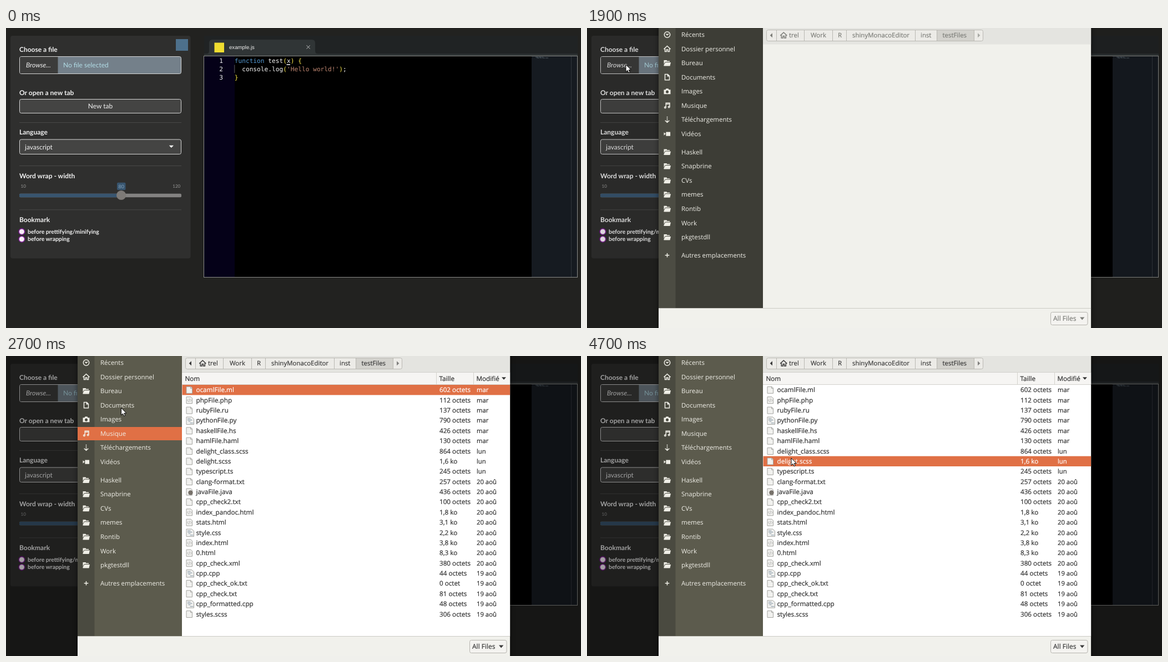
Recreate the animation shown at these times as an HTML page. Size 1036 by 541 pixels, loop 8 s.

```html
<!DOCTYPE html>
<html lang="en">
<head>
<meta charset="utf-8">
<title>Code editor, opening a file</title>
<style>
html, body { margin: 0; width: 100%; height: 100%; overflow: hidden; background: #222220; }
svg { display: block; width: 1036px; height: 541px; }
text { white-space: pre; text-rendering: geometricPrecision; }
.page { font: 12px Lato, sans-serif; fill: #f2f2f2; }
.bold { font-weight: 700; }
.italic { font-style: italic; }
.code { font: 11.2px "DejaVu Sans Mono", monospace; fill: #f4f4f4; }
.ui { font: 11.45px "Open Sans", sans-serif; }
.file { font: 11.7px "Open Sans", sans-serif; fill: #333; stroke: #333; stroke-width: .22; }
.on { fill: #fff; stroke: #fff; }
#path text { fill: currentColor; stroke: currentColor; stroke-width: .2; }
</style>
</head>
<body>
<svg id="stage" viewBox="0 0 1036 541" xmlns="http://www.w3.org/2000/svg">
  <filter id="blur" x="-10%" width="120%"><feGaussianBlur stdDeviation="5"/></filter>
  <g id="page"></g>
  <rect id="dim" width="1036" height="541" opacity="0"/>
  <g id="dialog" display="none">
    <g id="frame"></g>
    <g id="side"></g>
    <g id="path"></g>
    <g id="list"></g>
  </g>
  <path id="cursor" d="M0 0V13.2L3 10.4L5 14.8L7.2 13.8L5.3 9.6H9.3Z" fill="#fff" stroke="#000" stroke-width="1"/>
</svg>
<script>
const $ = id => document.getElementById(id);
const NS = "http://www.w3.org/2000/svg";

function add(parent, tag, attrs, text) {
  const el = document.createElementNS(NS, tag);
  for (const k in attrs) el.setAttribute(k, attrs[k]);
  if (text !== undefined) el.textContent = text;
  return parent.appendChild(el);
}
const rect = (p, x, y, width, height, fill, more) =>
  add(p, "rect", { x, y, width, height, fill, ...more });
const label = (p, x, y, text, cls, more) =>
  add(p, "text", { x, y, class: cls, ...more }, text);
const line = (p, d, stroke, more) =>
  add(p, "path", { d, stroke, fill: "none", ...more });
const shape = (p, d, fill) => add(p, "path", { d, fill });

// ---- page: control panel ----
function buildPanel(p) {
  rect(p, 0, 0, 1036, 541, "#222220");
  rect(p, 8, 14, 324.5, 401.5, "#2f2f2e", { rx: 4 });
  rect(p, 306, 20, 22, 21, "#4d708c");
  const bold = [
    [43, "Choose a file"], [120.5, "Or open a new tab"], [192.3, "Language"],
    [270.7, "Word wrap - width"], [349.8, "Bookmark"]
  ];
  for (const [y, s] of bold) label(p, 24, y, s, "page bold");
  for (const y of [170.5, 248.5, 327.8]) line(p, `M24 ${y}H316`, "#484847");

  const box = { rx: 3, stroke: "#d6d6d6" };
  rect(p, 24.5, 51.5, 291, 31, "#74808a", box);
  shape(p, "M93.5 52H27Q25 52 25 54V80Q25 82 27 82H93.5Z", "#3c3c3b");
  label(p, 36, 71.3, "Browse...", "page italic");
  label(p, 103, 71, "No file selected", "page", { style: "fill:#b2dce6" });

  rect(p, 24.5, 128.5, 291, 25, "#444443", box);
  label(p, 170, 145.2, "New tab", "page", { "text-anchor": "middle" });
  rect(p, 24.5, 201, 291, 26.5, "#444443", box);
  label(p, 34, 218.7, "javascript", "page");
  shape(p, "M293.8 211.8H302L297.9 216Z", "#fff");

  rect(p, 24, 298.7, 292, 6.6, "#838281", { rx: 2 });
  rect(p, 24, 298.7, 184, 6.6, "#38556f", { rx: 2 });
  add(p, "circle", { cx: 207.6, cy: 301.5, r: 8.6, fill: "#7d7a77" });
  rect(p, 200, 278.7, 15.5, 13.6, "#38556f", { rx: 2 });
  label(p, 207.7, 288.6, "80", "page", { style: "font-size:8.8px;fill:#86a4bb", "text-anchor": "middle" });
  const tick = { style: "font-size:8px;fill:#9a9a99" };
  label(p, 26.5, 287.8, "10", "page", tick);
  label(p, 300.3, 287.8, "120", "page", tick);

  [[367.2, "before prettifying/minifying"], [380.8, "before wrapping"]].forEach(([y, s]) => {
    add(p, "circle", { cx: 28.4, cy: y, r: 5.3, fill: "#f7eef7", stroke: "#7d2092", "stroke-width": 1.6 });
    label(p, 39, y + 3.4, s, "page bold", { style: "font-size:10.4px" });
  });
}

// ---- page: editor ----
function buildEditor(p) {
  rect(p, 357, 14, 673, 36, "#202324");
  rect(p, 357, 46.5, 673, 4, "#303536");
  shape(p, "M360 47Q366 47 366 41V27Q366 21 372 21H551Q557 21 557 27V41Q557 47 563 47Z", "#303536");
  rect(p, 375.5, 26.5, 17.5, 17.5, "#f0dd30");
  label(p, 402, 37.7, "example.js", "", { style: "font:9.6px 'Liberation Sans',sans-serif;fill:#eee" });
  line(p, "M541.5 31.3l6.2 6.2m0-6.2l-6.2 6.2", "#c4c6c6");

  rect(p, 356.5, 50.5, 673, 399, "#000");
  rect(p, 357, 51, 55, 398, "#050118");
  rect(p, 947, 51, 82, 398, "#161b21");
  line(p, "M1018.5 51V449", "#30343b");
  line(p, "M954 52.5h14M956 54h9m1 0h12", "#5d6a72", { "stroke-width": .8, "stroke-dasharray": "5 1" });
  rect(p, 356.5, 50.5, 673, 399, "none", { stroke: "#8a8b88" });

  const lines = [
    [["function", "#569cd6"], [" test"], ["(", "#fbe94a"], ["x"], [") {", "#fbe94a"]],
    [["  console.log"], ["(", "#fbe94a"], ["'Hello world!'", "#bd8570"], [")", "#fbe94a"], [";"]],
    [["}", "#fbe94a"]]
  ];
  lines.forEach((parts, i) => {
    const y = 62.7 + i * 15.3;
    label(p, 391, y, i + 1, "code", { "text-anchor": "end" });
    const row = label(p, 411.7, y, "", "code");
    for (const [s, fill] of parts) add(row, "tspan", fill ? { fill } : {}, s);
  });
  line(p, "M411.8 66.5V81", "#5c5c5c");
  line(p, "M505.5 66H512", "#fff", { "stroke-width": 1.5 });
}

// ---- dialog: sidebar ----
const ICONS = {
  clock: ["M5.2 0A5.2 5.2 0 1 1-5.2 0A5.2 5.2 0 1 1 5.2 0M-2-1.6L0 .6L2.4-1.6"],
  home: ["M-6 .6L0-5L6 .6M-4 0V5H-1.2V1.5H1.2V5H4V0"],
  folder: ["", "M-6-5.2H-1L0-3.6H4.6V-2.2H-3.4L-6 2ZM-3.2-1.2H6.5L5 5.4H-6V3.4Z"],
  doc: ["M-4-5.2H1L4-2.2V5.2H-4ZM.8-5V-2H4"],
  camera: ["", "M-6-3H-3L-2-5H2L3-3H6V5H-6ZM0-1.6A2.6 2.6 0 1 0 .01-1.6"],
  music: ["M-2.3 3.6V-4.6H4.5V2.4M-2.3-2.4H4.5M-5 3.6a1.3 1.3 0 1 0 2.7 0a1.3 1.3 0 1 0-2.7 0M1.8 2.6a1.3 1.3 0 1 0 2.7 0a1.3 1.3 0 1 0-2.7 0"],
  down: ["M0-5.5V-3.5M0-2.2V0M0 1V4.6M-3.8 1.4L0 5L3.8 1.4"],
  video: ["", "M-2.2-3.4H5.6V3.8H-2.2ZM-6-2.6L-2.6 0L-6 3Z"],
  plus: ["M-3.8 0H3.8M0-3.8V3.8"]
};
function icon(p, name, x, y, color) {
  const [stroke, fill] = ICONS[name];
  const g = add(p, "g", { transform: `translate(${x} ${y})` });
  if (stroke) line(g, stroke, color, { "stroke-width": 1.5 });
  if (fill) add(g, "path", { d: fill, fill: color, "fill-rule": "evenodd" });
}

const PLACES = [
  ["clock", "Récents"], ["home", "Dossier personnel"], ["folder", "Bureau"], ["doc", "Documents"],
  ["camera", "Images"], ["music", "Musique"], ["down", "Téléchargements"], ["video", "Vidéos"]
];
const MARKS = ["Haskell", "Snapbrine", "CVs", "memes", "Rontib", "Work", "pkgtestdll"];
const LEFT = 129, SPLIT = 317, RIGHT = 908.1;

function buildFrame(p) {
  rect(p, LEFT, -20, RIGHT - LEFT, 600, "#000", { filter: "url(#blur)", opacity: .5 });
  rect(p, LEFT, 0, RIGHT - LEFT, 541, "#f1f1ec");
  rect(p, SPLIT, 0, RIGHT - SPLIT, 29.5, "#e4e4e0");
  line(p, `M${LEFT} 505.5H${RIGHT}`, "#cbcac4");
}

function buildSide(p) {
  const bg = rect(p, LEFT, 0, SPLIT - LEFT, 505, "#5c5b4d");
  const strip = rect(p, LEFT, 0, 30.5, 505, "#4a4a40");
  const hover = rect(p, LEFT, 128, SPLIT - LEFT, 24, "#e07045", { display: "none" });
  const place = (name, s, y) => {
    icon(p, name, 144.5, y, "#efeee6");
    label(p, 170, y + 4, s, "ui", { fill: "#f0efe8" });
  };
  PLACES.forEach(([name, s], i) => place(name, s, 12 + i * 25.55));
  MARKS.forEach((s, i) => place("folder", s, 223.6 + i * 25.6));
  place("plus", "Autres emplacements", 409.8);
  return { bg, strip, hover };
}

// ---- dialog: path bar and footer ----
const CRUMBS = [
  [341, "trel", 364], [391, "Work", 403], [442, "R", 452], [467, "shinyMonacoEditor", 478],
  [591, "inst", 601], [630, "testFiles", 640.5]
];
function buildPath(p) {
  rect(p, 323.5, 3.5, 390, 20, "#ecebe7", { rx: 3, stroke: "#b9b8b2" });
  rect(p, 630, 4, 67, 19, "#d3d2cd");
  shape(p, "M334 9.2V17.2L329.6 13.2Z", "currentColor");
  add(p, "path", { d: "M704 9.2V17.2L708.4 13.2Z", fill: "currentColor", opacity: .6 });
  for (const [x, s, tx] of CRUMBS) {
    line(p, `M${x + .5} 4V23`, "#b9b8b2");
    label(p, tx, 17.1, s, "ui");
  }
  line(p, "M697.5 4V23", "#b9b8b2");
  icon(p, "home", 354.3, 13, "currentColor");
  rect(p, 835.5, 512.5, 66.5, 23, "#f4f3f0", { rx: 3, stroke: "#b5b4ae" });
  label(p, 840, 528.2, "All Files", "ui", { style: "font-size:12px" });
  shape(p, "M888 521.6H896.4L892.2 526.4Z", "currentColor");
}

// ---- dialog: file list ----
// name | size | day | icon (p page, c code, t text, j cup)
const FILES = `ocamlFile.ml|602|mar|p
phpFile.php|112|mar|c
rubyFile.ru|137|mar|p
pythonFile.py|790|mar|t
haskellFile.hs|426|mar|p
hamlFile.haml|130|mar|p
delight_class.scss|864|lun|p
delight.scss|1,6 ko|lun|p
typescript.ts|245|lun|p
clang-format.txt|257|20 aoû|p
javaFile.java|436|20 aoû|j
cpp_check2.txt|100|20 aoû|p
index_pandoc.html|1,8 ko|20 aoû|c
stats.html|3,1 ko|20 aoû|c
style.css|2,2 ko|20 aoû|t
index.html|3,8 ko|20 aoû|c
0.html|8,3 ko|20 aoû|c
cpp_check.xml|380|20 aoû|c
cpp.cpp|44|19 aoû|t
cpp_check_ok.txt|0 octet|19 aoû|p
cpp_check.txt|81|19 aoû|p
cpp_formatted.cpp|48|19 aoû|t
styles.scss|306|19 aoû|p`.split("\n").map(s => s.split("|"));
const PITCH = 18.375;

function fileIcon(p, kind, y) {
  const g = add(p, "g", { transform: `translate(324.5 ${y})` });
  const gray = "#a3a39f";
  add(g, "path", { d: kind === "t" ? "M.5-6.5H10L14-3V7H.5Z" : "M.5-6H8.5L11-3.5V6H.5Z", fill: "#f1f1ef", stroke: gray });
  if (kind === "p") line(g, "M8-6V-3H11", gray);
  if (kind === "c") line(g, "M4-2L2 .3L4 2.6M7.5-2L9.5 .3L7.5 2.6M6.5-3L5 3.5", gray, { "stroke-width": .8 });
  if (kind === "t") line(g, "M2.5-3.5H8M2.5-1H11M4 1.5H8M7 4.5H13", "#7f92a0");
  if (kind === "j") add(g, "circle", { cx: 8, cy: 1.5, r: 4.2, fill: "#77716a" });
}

function buildList(p) {
  rect(p, SPLIT, 29.5, RIGHT - SPLIT, 475.5, "#fff");
  rect(p, SPLIT, 29.5, RIGHT - SPLIT, 21.5, "#f6f5f3");
  line(p, "M317 29.5H908M317 51.5H908M775.5 30V51M842.5 30V51", "#d3d2cd");
  [[322.5, "Nom"], [780.5, "Taille"], [847.5, "Modifié"]].forEach(([x, s]) => label(p, x, 44.8, s, "file"));
  shape(p, "M893 38.2H901L897 42.8Z", "#333");
  const bar = rect(p, SPLIT + .6, 0, RIGHT - SPLIT - .6, PITCH, "#e07045");
  const rows = FILES.map(([name, size, day, kind], i) => {
    const y = 61.3 + i * PITCH;
    fileIcon(p, kind, y);
    const row = add(p, "g", {});
    label(row, 342.5, y + 4, name, "file");
    label(row, 781, y + 4, /o/.test(size) ? size : size + " octets", "file");
    label(row, 848, y + 4, day, "file", { style: "font-size:11.3px" });
    return row;
  });
  return { bar, rows };
}

buildPanel($("page"));
buildEditor($("page"));
buildFrame($("frame"));
const side = buildSide($("side"));
buildPath($("path"));
const list = buildList($("list"));

// ---- timeline: [ms, values...], each step holds until the next ----
const MOVES = [
  [600, 82, 40], [700, 78, 52], [800, 72, 62], [900, 67, 65], [1500, 70, 66],
  [2600, 138, 80], [2700, 207.5, 93.5], [2800, 306, 142], [3000, 368, 182],
  [3400, 370, 185], [4400, 369.5, 184.5], [4600, 368, 184]
];
const DIM = [[0, 0], [1900, .1], [2000, .16], [2100, .21], [2200, .26], [2300, .3], [2400, .34]];
const at = (steps, t) => steps.filter(s => s[0] <= t).pop();
const show = (el, on) => el.setAttribute("display", on ? "inline" : "none");

function draw(t) {
  const move = at(MOVES, t);
  show($("cursor"), move);
  if (move) $("cursor").setAttribute("transform", `translate(${move[1]} ${move[2]})`);
  $("dim").setAttribute("opacity", at(DIM, t)[1]);

  const ready = t >= 2000;
  show($("dialog"), t >= 1900);
  show($("list"), ready);
  side.bg.setAttribute("fill", ready ? "#5c5b4d" : "#3d3d36");
  side.strip.setAttribute("fill", ready ? "#4a4a40" : "#4c4c43");
  $("path").setAttribute("color", ready ? "#3a3a3a" : "#7d7e79");
  show(side.hover, t >= 2700 && t < 2800);

  const pick = t < 4600 ? 0 : 7;
  list.bar.setAttribute("y", 52 + pick * PITCH);
  list.rows.forEach((row, i) => {
    for (const cell of row.children) cell.setAttribute("class", i === pick ? "file on" : "file");
  });
}

const start = performance.now();
function tick() {
  draw((performance.now() - start) % 8000);
  requestAnimationFrame(tick);
}
tick();
</script>
</body>
</html>
```
